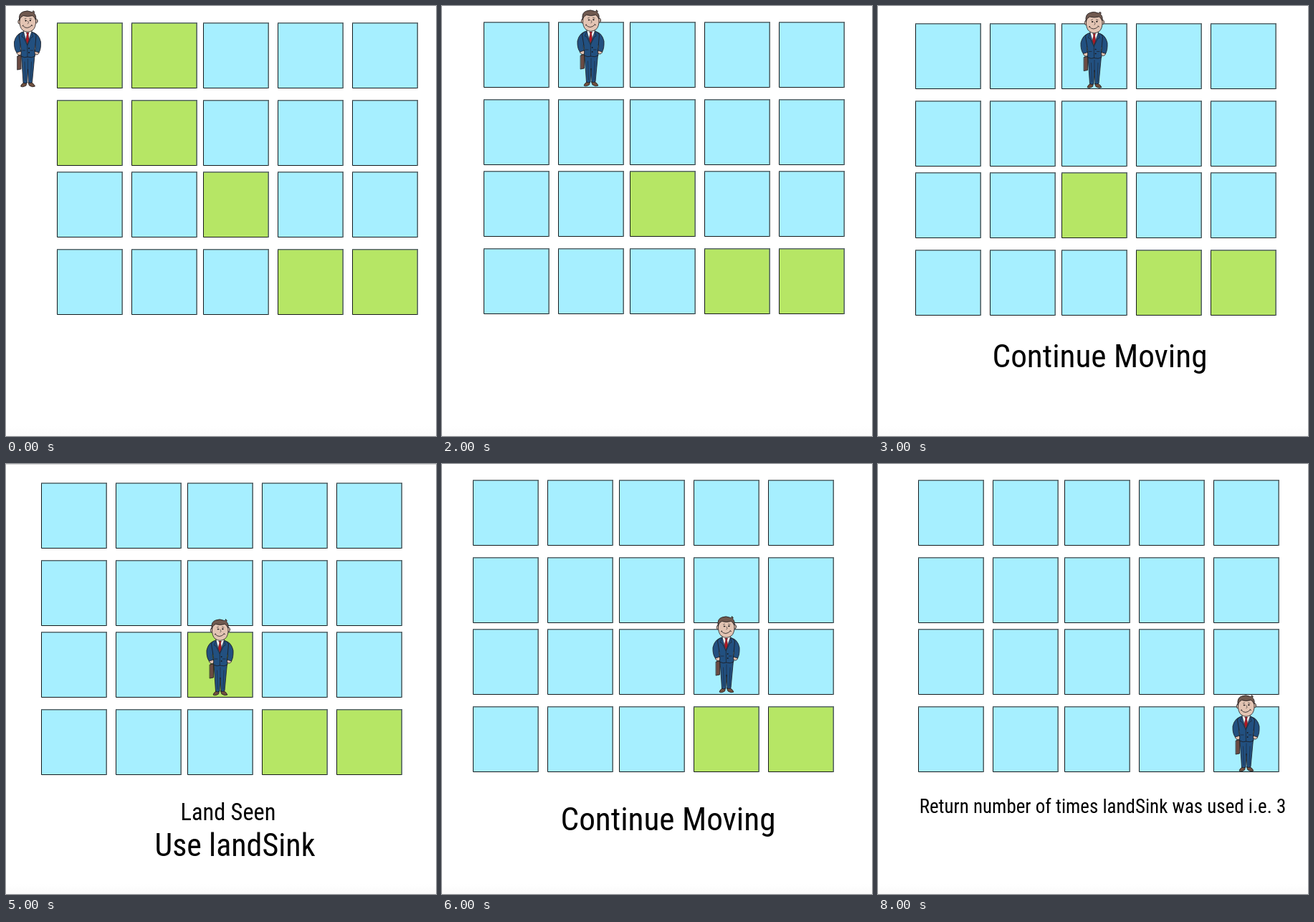
An HTML page that plays this animation: 600 px wide and 600 px high, repeating every 9000 ms.

```html
<!DOCTYPE html>
<html lang="en">
<head>
<meta charset="utf-8">
<title>Counting islands</title>
<style>
  html, body { margin: 0; width: 100%; height: 100%; overflow: hidden; background: #fff; }
  svg { display: block; width: 600px; height: 600px; }
  text {
    font-family: "Roboto Condensed", Roboto, "Open Sans", sans-serif;
    font-stretch: 75%;
    text-anchor: middle;
  }
  .ink { stroke: #1c1a1c; stroke-width: .8; stroke-linejoin: round; stroke-linecap: round; }
  .line { fill: none; }
</style>
</head>
<body>
<svg id="stage" viewBox="0 0 600 600">
  <defs>
    <linearGradient id="fade" x1="0" y1="0" x2="0" y2="1">
      <stop offset="0" stop-color="#fff"/>
      <stop offset="1" stop-color="#fafafa"/>
    </linearGradient>

    <g id="cell">
      <rect x=".5" width="91" height="91"/>
      <path d="M.5 0V90.5H91" fill="none" stroke="#151a1c"/>
      <path d="M0-.2H91.2V91" fill="none" stroke="#566468" stroke-width="1.6"/>
    </g>

    <g id="man" class="ink">
      <!-- briefcase -->
      <path d="M17 70Q18 66 20 69" class="line"/>
      <path d="M16 70L21 69V88L16 89Z" fill="#6b4b43"/>
      <!-- shoes -->
      <path d="M26 106Q21 109 20.500 112Q23 114 28 111L29 107Z" fill="#70503f"/>
      <path d="M34 106Q39 108 40.500 112Q37 114 32.500 111L31 107Z" fill="#70503f"/>
      <!-- trousers -->
      <path d="M21.500 69L24 107Q27 109 29.500 107L30.500 88L31.500 107Q34 108 36.500 106.500L40 69Z" fill="#225080"/>
      <path d="M30.500 74V90M26 78L27 104M35.500 78L34.500 104" class="line" stroke-width=".5"/>
      <!-- hands -->
      <path d="M15 63Q14 67 18 68.500Q22 69 22 65L20 62Z" fill="#e3c4b3"/>
      <path d="M46 63Q47 67 43 68Q39 68 39 65L41 62Z" fill="#e3c4b3"/>
      <!-- sleeves and jacket -->
      <path d="M22 37Q14 39 11.500 50Q11 60 15 65L21 63Q18 56 22 50Z" fill="#225080"/>
      <path d="M38 37Q46 39 48.500 50Q49 60 46 65L40 63Q43 56 39 50Z" fill="#225080"/>
      <path d="M24 36Q19 37 18 41L20 53Q22 61 21 70Q26 73 30 71Q36 73 40.500 70Q39 61 41 53L42 41Q40 37 36 36Z" fill="#225080"/>
      <!-- shirt, tie, lapels -->
      <path d="M24.500 35L29.500 54L36 35Z" fill="#fff" stroke-width=".5"/>
      <path d="M28.500 37H32L31.200 40L32.200 47L29.800 53L27.600 47L29.200 40Z" fill="#b31824" stroke-width=".5"/>
      <path d="M24.500 36L22 43L24.500 44L29.800 55L35 44L37.500 43L36 36M29.800 55L30 71M23 62H26.500M34 62H37.500" class="line" stroke-width=".6"/>
      <circle cx="32" cy="59" r=".5"/><circle cx="32" cy="65" r=".5"/>
      <!-- head -->
      <ellipse cx="18.800" cy="22" rx="2" ry="3" fill="#e3c4b3"/>
      <ellipse cx="42.200" cy="21" rx="1.800" ry="3" fill="#e3c4b3"/>
      <path d="M19 20Q20 10 30 10Q40 10 41.500 20Q42 30 37 34Q30 38.500 23.500 34Q18.500 30 19 20Z" fill="#e3c4b3"/>
      <path d="M18.500 19Q17.500 10 24 8Q30 5.500 36 8.500Q39 8 38 6.500Q41 8.500 39 10Q42.500 13 41.500 19Q39.500 15 37 13.500Q30 15.500 24 13.500Q20.500 15 18.500 19Z" fill="#70594f"/>
      <path d="M26 18L28 17.300M33 17.300L35.500 18M30.500 21Q33 23.500 30.500 25" class="line" stroke-width=".6"/>
      <path d="M23.500 27.500Q29 34 36 27M22.800 27.800L24.200 27M35.500 26.500L37 27.500" class="line"/>
      <circle cx="27.500" cy="20.500" r=".7"/><circle cx="33.800" cy="20.200" r=".7"/>
    </g>
  </defs>
</svg>
<script>
const NS = "http://www.w3.org/2000/svg";
const STEP_MS = 1000;
const WATER = "#a6efff", LAND = "#b6e665";
const COLS = [0, 104, 204, 308, 412];
const ROWS = [0, 108, 208, 316];
const stage = document.getElementById("stage");

const go = (x, y) => [["Continue Moving", x, y, 47, 300]];
const sink = y => [["Land Seen", 310, y - 50, 34, 133], ["Use landSink", 319.5, y, 47, 224]];

// grid position, man offset, captions [text, x, baseline, size, room]
const steps = [
  { grid: [71, 24], man: [0, 0], text: [] },
  { grid: [62, 23], man: [78, 0], text: sink(542) },
  { grid: [58, 23], man: [177.5, -1], text: [] },
  { grid: [52, 25], man: [271.5, 1.5], text: go(309.5, 504) },
  { grid: [49, 25], man: [268.5, 110], text: go(306.5, 504) },
  { grid: [49, 27], man: [268.5, 210], text: sink(547), rule: true },
  { grid: [43, 23], man: [366.5, 206], text: go(315.5, 511) },
  { grid: [53, 21], man: [376, 314], text: sink(536) },
  { grid: [56, 23], man: [483.5, 316], text: [["Return number of times landSink was used i.e. 3", 313.5, 487, 29, 512]] }
];

function add(parent, tag, attrs) {
  const el = document.createElementNS(NS, tag);
  for (const key in attrs) el.setAttribute(key, attrs[key]);
  return parent.appendChild(el);
}

// Each island stays land until it is sunk.
function isLand(row, col, step) {
  if (row < 2 && col < 2) return step < 2;
  if (row === 2 && col === 2) return step < 6;
  return row === 3 && col > 2 && step < 8;
}

function caption(parent, [words, x, y, size, room]) {
  const el = add(parent, "text", { x, y, "font-size": size });
  el.textContent = words;
  const length = el.getComputedTextLength();
  if (length > room) el.setAttribute("font-size", size * room / length);
}

add(stage, "rect", { y: 586, width: 600, height: 14, fill: "url(#fade)" });

const scenes = steps.map(({ grid, man, text, rule }, step) => {
  const scene = add(stage, "g", {});
  if (rule) add(scene, "rect", { width: 600, height: 1, fill: "#d6d6d6" });
  ROWS.forEach((dy, row) => COLS.forEach((dx, col) =>
    add(scene, "use", {
      href: "#cell", x: grid[0] + dx, y: grid[1] + dy,
      fill: isLand(row, col, step) ? LAND : WATER
    })));
  add(scene, "use", { href: "#man", x: man[0], y: man[1] });
  text.forEach(line => caption(scene, line));
  return scene;
});

const start = performance.now();
function draw() {
  const now = Math.floor((performance.now() - start) / STEP_MS) % steps.length;
  scenes.forEach((scene, i) => scene.style.display = i === now ? "" : "none");
  requestAnimationFrame(draw);
}
draw();
</script>
</body>
</html>
```
